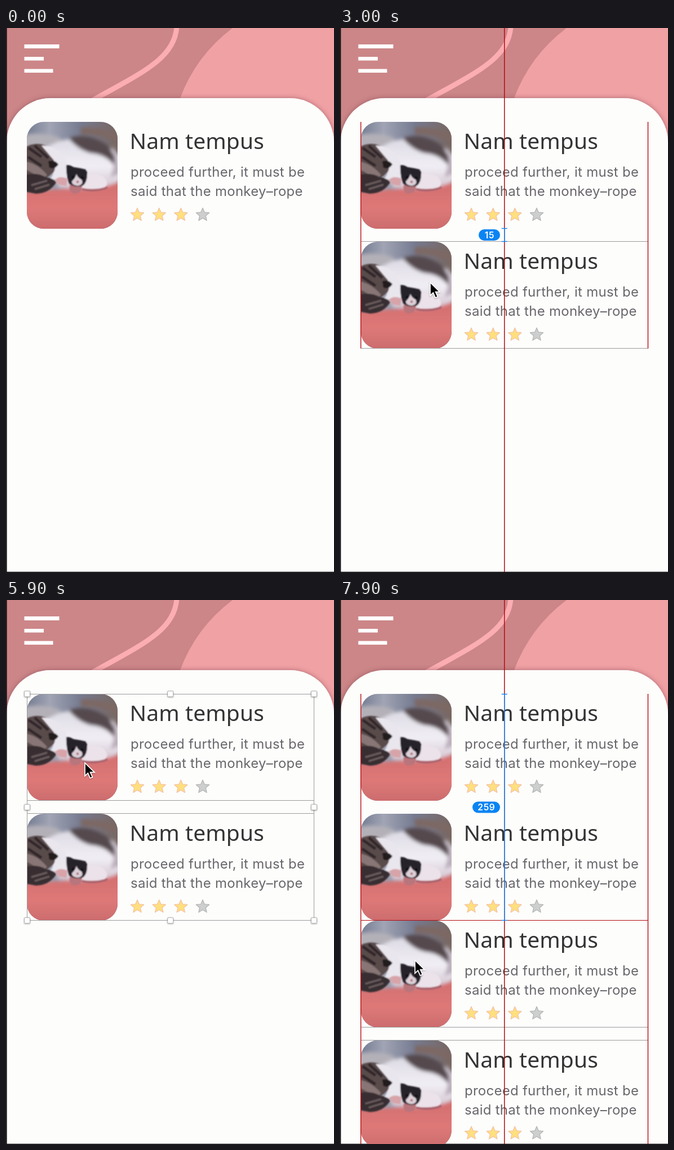
Recreate the animation shown at these times as an HTML page. Size 582 by 962 pixels, loop 8000 ms.

```html
<!DOCTYPE html>
<html lang="en">
<head>
<meta charset="utf-8">
<title>Card layout</title>
<style>
html, body { margin: 0; width: 100%; height: 100%; overflow: hidden; background: #fdfdfc; }
svg { display: block; }
.title { font: 39px "Noto Sans", "Open Sans", sans-serif; letter-spacing: .1px; fill: #333; }
.copy { font: 24px Inter, "Liberation Sans", sans-serif; letter-spacing: .26px; fill: #69666b; }
.badge { font: 600 15.5px Inter, sans-serif; letter-spacing: .7px; fill: #fff; text-anchor: middle; }
</style>
</head>
<body>
<svg width="582" height="962" viewBox="0 0 582 962">
  <defs>
    <clipPath id="frame"><rect width="161" height="189" rx="30"/></clipPath>
    <linearGradient id="wall">
      <stop offset="0" stop-color="#757c92"/><stop offset=".25" stop-color="#a0a4b4"/>
      <stop offset=".6" stop-color="#757a90"/><stop offset="1" stop-color="#776660"/>
    </linearGradient>
    <linearGradient id="cloth" x1="0" y1="0" x2="0" y2="1">
      <stop offset="0" stop-color="#d36e6f"/><stop offset=".5" stop-color="#de7978"/><stop offset="1" stop-color="#c7686a"/>
    </linearGradient>
    <linearGradient id="fur" x1="0" y1="0" x2="0" y2="1">
      <stop offset="0" stop-color="#dcdae3"/><stop offset=".55" stop-color="#f1eef5"/><stop offset="1" stop-color="#d2c4d0"/>
    </linearGradient>
    <filter id="soft" x="-20%" y="-20%" width="140%" height="140%"><feGaussianBlur stdDeviation="3.2"/></filter>
    <filter id="fine" x="-20%" y="-20%" width="140%" height="140%"><feGaussianBlur stdDeviation="1.2"/></filter>
    <filter id="lift" x="-20%" y="-20%" width="140%" height="140%"><feDropShadow dx="0" dy="0" stdDeviation="4" flood-color="#70383c" flood-opacity=".55"/></filter>
    <filter id="drop" x="-50%" y="-50%" width="200%" height="200%"><feDropShadow dx="0" dy="1" stdDeviation="1" flood-opacity=".35"/></filter>

    <g id="photo" clip-path="url(#frame)">
      <rect width="161" height="189" fill="url(#wall)"/>
      <g filter="url(#soft)">
        <path d="M-10 24Q30 16 58 28L70 48L-10 52Z" fill="#b3b0b8"/>
        <path d="M-10 123L60 119L175 106V200H-10Z" fill="url(#cloth)"/>
        <path d="M34 46Q62 28 90 30Q150 38 166 62V104Q130 124 56 116Z" fill="url(#fur)"/>
        <path d="M74 29Q106 18 138 38Q158 52 157 80Q144 60 120 56Q96 54 74 29Z" fill="#54494d"/>
        <path d="M96 16Q130 14 165 30" stroke="#7d6763" stroke-width="13" fill="none"/>
        <path d="M152 42Q164 60 164 92L148 98Q160 70 152 42Z" fill="#b9adba"/>
      </g>
      <g filter="url(#fine)">
        <path d="M-5 46Q14 34 34 42Q52 56 56 76Q46 96 24 104L-5 108Z" fill="#5a4b4c"/>
        <path d="M26 42Q52 42 66 62Q76 82 70 98Q58 106 42 100Q54 84 48 68Z" fill="#eae6ee"/>
        <path d="M3 46L26 62M14 42L38 64M2 62L26 78M4 78L24 90" stroke="#30272a" stroke-width="5"/>
        <path d="M-3 70Q20 74 36 94L26 102Q8 88-3 84Z" fill="#877675"/>
        <path d="M-4 94Q17 88 34 98Q46 99 52 107Q41 126 16 127L-4 123Z" fill="#382e32"/>
        <path d="M8 112L36 104M14 119L40 111" stroke="#6d5f60" stroke-width="3"/>
        <path d="M38 70Q48 66 56 75Q50 85 40 81Z" fill="#211b1f"/>
        <path d="M50 102Q60 94 72 101L70 113L56 111Z" fill="#d6a4a9"/>
        <path d="M98 96Q113 86 135 96Q150 110 134 118L98 119Z" fill="#ece2ea"/>
        <path d="M98 119Q122 124 143 116" stroke="#a9616b" stroke-width="4" fill="none"/>
        <path d="M77 110H97Q101 126 84 127Q72 124 77 110Z" fill="#b9757b"/>
        <path d="M70 76L77 77L83 80L95 82L104 84L107 89Q108 107 99 113Q84 117 75 109Q69 94 70 76Z" fill="#28242b"/>
        <path d="M88 92Q90 99 97 102Q102 110 91 113Q79 112 80 105Q86 100 88 92Z" fill="#ddd0d8"/>
        <circle cx="82" cy="98" r="2.5" fill="#100e13"/><circle cx="98" cy="99" r="2.5" fill="#100e13"/>
        <circle cx="90" cy="106" r="2.200" fill="#a86d77"/>
      </g>
    </g>

    <path id="star" stroke-width="1.3" stroke-linejoin="round"/>
    <g id="card">
      <use href="#photo" x="37"/>
      <text class="title" x="219.5" y="48">Nam tempus</text>
      <text class="copy" x="221" y="97">proceed further, it must be</text>
      <text class="copy" x="221" y="131">said that the monkey–rope</text>
      <g fill="#ffdf7e" stroke="#f3c3a2">
        <use href="#star" x="233" y="164.5"/><use href="#star" x="271.7" y="164.5"/><use href="#star" x="310.3" y="164.5"/>
      </g>
      <use href="#star" x="349" y="164.5" fill="#cdcfcf" stroke="#b5b5b4"/>
    </g>
  </defs>

  <rect width="582" height="300" fill="#cc8688"/>
  <path d="M402 0Q337 49 309 124L309 210H582V0Z" fill="#f0a1a4"/>
  <path d="M303 -3C300 55 238 80 150 130" fill="none" stroke="#fbadb1" stroke-width="9"/>
  <path d="M32.500 29H94.500V36H32.500ZM32.500 51H67V57.500H32.500ZM32.500 72.500H83.500V79H32.500Z" fill="#fff"/>
  <path d="M1 1000V202A78 78 0 0 1 79 124H504A78 78 0 0 1 582 202V1000Z" fill="#fdfdfc" filter="url(#lift)"/>
  <path d="M0 961.500H582" stroke="#8c8c8c"/>
  <rect width="1.600" height="962" fill="#161213"/>

  <g id="cards"></g>
  <g id="overlay"></g>
  <path id="cursor" d="M0 0V23L5.400 18.200L9.200 27L13.400 25.200L9.600 16.700H17Z" fill="#050505" stroke="#fff" stroke-width="1.700" filter="url(#drop)"/>
</svg>
<script>
const LOOP = 8000, STEP = 100;
const UNIT = 1.547;            // stage pixels per ruler unit
const TOP = 166, LEFT = 37.5, RIGHT = 546.5, MID = 291.75;
const CARD = 122, PITCH = 137; // ruler units
const RED = '#b30c11', BRIGHT = '#e01218', GREY = '#9c9c9c', BLUE = '#0b84f3';

// time, pointer x, pointer y, dragged distance in units
const first = [
  [200, 174, 290, 0], [500, 165, 242, 0], [900, 164, 270, 18], [1500, 163, 334, 59],
  [2000, 162, 390, 97], [2200, 161, 403, 104], [2400, 161, 403, 104], [2700, 160, 444, 131],
  [3000, 160, 450, 137], [3600, 160, 450, 137], [4000, 158, 448, 136], [4500, 158, 448, 136],
  [4700, 158, 450, 137], [5100, 158, 440, 137], [5600, 146, 312, 137], [5900, 140, 288, 137],
  [6400, 138, 237, 137]
];
const second = [
  [6400, 138, 237, 0], [6500, 138, 240, 0], [6700, 137, 350, 50], [7000, 135, 556, 165],
  [7200, 135, 582, 215], [7500, 134, 620, 246], [7800, 133, 637, 259], [8000, 133, 637, 259]
];

const byId = id => document.getElementById(id);
const px = units => TOP + units * UNIT;
const crisp = y => Math.floor(y) + .5;

byId('star').setAttribute('d', 'M' + Array.from({ length: 10 }, (_, i) => {
  const r = i % 2 ? 5.6 : 12.2, a = (i - 2.5) * Math.PI / 5;
  return (r * Math.cos(a)).toFixed(2) + ' ' + (r * Math.sin(a)).toFixed(2);
}).join('L') + 'Z');

// Back to front: first card, its copy, second card, its copy
const cards = Array.from({ length: 4 }, () => {
  const use = document.createElementNS('http://www.w3.org/2000/svg', 'use');
  use.setAttribute('href', '#card');
  return byId('cards').appendChild(use);
});

function place(card, units) {
  card.style.display = units === null ? 'none' : '';
  if (units !== null) card.setAttribute('y', px(units));
}

function sample(keys, t) {
  const i = keys.findIndex(k => k[0] > t);
  if (i < 0) return keys[keys.length - 1].slice(1);
  if (i === 0) return keys[0].slice(1);
  const a = keys[i - 1], b = keys[i], f = (t - a[0]) / (b[0] - a[0]);
  return [1, 2, 3].map(n => a[n] + (b[n] - a[n]) * f);
}

const line = (x1, y1, x2, y2, color, width = 1) =>
  `<path d="M${x1} ${y1}L${x2} ${y2}" stroke="${color}" stroke-width="${width}"/>`;
const rule = (y, color = GREY) => line(LEFT, crisp(y), RIGHT, crisp(y), color);

function selection(tops) {
  const y1 = px(tops[0]), y2 = px(tops[tops.length - 1] + CARD);
  let out = tops.map(u => rule(px(u)) + rule(px(u + CARD))).join('');
  out += line(LEFT, y1, LEFT, y2, GREY) + line(RIGHT, y1, RIGHT, y2, GREY);
  for (const y of [y1, (y1 + y2) / 2, y2])
    for (const x of [LEFT, MID, RIGHT])
      if (x !== MID || y === y1 || y === y2)
        out += `<rect x="${x - 5}" y="${y - 5}" width="10" height="10" rx="1" fill="#fff" stroke="#999" stroke-width=".8" filter="url(#drop)"/>`;
  return out;
}

function measure(from, to) {
  const value = String(to - from), y1 = crisp(px(from)), y2 = crisp(px(to)), y = (y1 + y2) / 2;
  const w = 16 + value.length * 11;
  return line(MID, y1, MID, y2, BLUE, 1.5) +
    line(MID - 5, y1, MID + 5, y1, BLUE, 1.4) + line(MID - 5, y2, MID + 5, y2, BLUE, 1.4) +
    `<rect x="${284 - w}" y="${y - 10}" width="${w}" height="20" rx="10" fill="${BLUE}"/>` +
    `<text class="badge" x="${284.4 - w / 2}" y="${y + 5.6}">${value}</text>`;
}

function guides(d, tops, height) {
  const end = px(d + height), snap = crisp(end);
  let out = tops.map(u => rule(px(u)) + rule(px(u + CARD))).join('');
  out += line(MID, 0, MID, 962, RED, 1.5);
  out += line(LEFT - .5, TOP, LEFT - .5, end, RED, 1.4) + line(RIGHT, TOP, RIGHT, end, RED, 1.4);
  if (d === 104) out += line(1, snap, LEFT, snap, BRIGHT, 1.6) + line(RIGHT, snap, 582, snap, BRIGHT, 1.6) + rule(end, '#a3474e');
  if (d === 259) out += rule(px(d), RED);
  if (d > 0) out += d > height ? measure(height, d) : measure(0, d);
  return out;
}

function draw(t) {
  const again = t >= 6400;
  const [x, y, raw] = sample(again ? second : first, t);
  const d = Math.round(raw);
  const dragging = again ? t >= 6500 : t >= 500 && t < 4800;
  place(cards[0], 0);
  place(cards[1], again && dragging ? d : null);
  place(cards[2], again ? PITCH : t >= 500 ? d : null);
  place(cards[3], again && dragging ? d + PITCH : null);

  let out = '';
  if (dragging) out = again ? guides(d, [d, d + PITCH], CARD + PITCH) : guides(d, [d], CARD);
  else if (t >= 5600) out = selection([0, PITCH]);
  else if (t >= 4800) out = selection([PITCH]);
  else if (t >= 300) out = selection([0]);
  byId('overlay').innerHTML = out;

  const cursor = byId('cursor');
  cursor.style.display = t < 200 ? 'none' : '';
  cursor.setAttribute('transform', `translate(${x} ${y})`);
}

const start = performance.now();
let last = -1;
function tick(now) {
  const t = Math.floor(Math.max(0, now - start) % LOOP / STEP) * STEP;
  if (t !== last) draw(last = t);
  requestAnimationFrame(tick);
}
draw(0);
requestAnimationFrame(tick);
</script>
</body>
</html>
```
